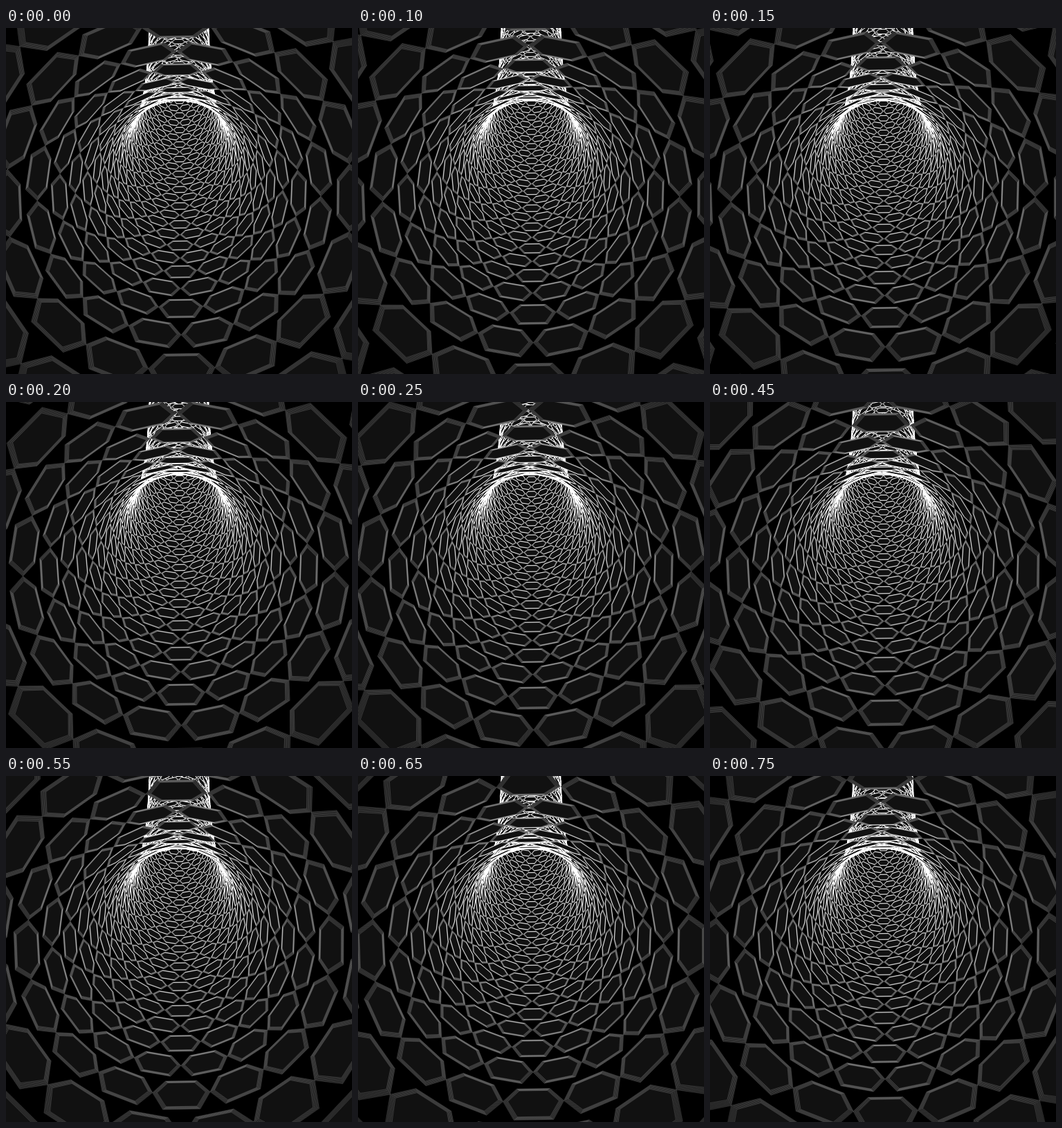
An HTML page with a canvas for the animation above (800 ms loop, 500 by 500 pixels).

```html
<!DOCTYPE html>
<html lang="en">
<head>
<meta charset="utf-8">
<title>Hexagon tunnel</title>
<style>
  html, body { margin: 0; width: 100%; height: 100%; overflow: hidden; background: #000; }
  canvas { display: block; width: 500px; height: 500px; }
</style>
</head>
<body>
<canvas id="stage" width="500" height="500"></canvas>
<script>
const ctx = document.getElementById('stage').getContext('2d');
const LOOP = 800, STEPS = 16;

// Torus with major radius 1; the camera sits inside the tube.
const TUBE = 0.1325, BACK = 0.169, FOCAL = 367;
const AROUND = 16;
const PERIOD = 2 * Math.PI / 72;
const START = 0.112, ROLL = 0.016;
const HALF = Math.PI / AROUND;
const FIRST_ROW = -7, LAST_ROW = 38;

// Nested outlines inside each hexagon.
const LINES = 6, INSET = 0.032;

// Corners as [across, along] in half widths and periods.
const FLAT = 0.59, RISE = (1 - FLAT) / 2;
const CORNERS = [[1, 0], [FLAT, RISE], [-FLAT, RISE], [-1, 0], [-FLAT, -RISE], [FLAT, -RISE]];

function place(theta, phi) {
  const radius = 1 + TUBE * Math.cos(phi);
  return [
    TUBE * Math.sin(phi),
    1 - radius * Math.cos(theta),
    BACK + radius * Math.sin(theta)
  ];
}

function hexagon(theta, phi) {
  const points = CORNERS.map(([a, l]) => place(theta + l * PERIOD, phi + a * HALF));
  const mid = [0, 1, 2].map(i => points.reduce((sum, p) => sum + p[i], 0) / 6);
  return { points, mid, dist: Math.hypot(...mid) };
}

function trace({ points, mid }, scale) {
  ctx.beginPath();
  for (const p of points) {
    const [x, y, z] = p.map((v, i) => mid[i] + (v - mid[i]) * scale);
    ctx.lineTo(250 + FOCAL * x / z, 250 - FOCAL * y / z);
  }
  ctx.closePath();
}

function draw(progress) {
  const cells = [];
  for (let row = FIRST_ROW; row <= LAST_ROW; row++) {
    const theta = START + (row / 2 - progress) * PERIOD;
    const shift = row % 2 ? HALF : 0;
    for (let i = 0; i < AROUND; i++) {
      const cell = hexagon(theta, ROLL + shift + 2 * HALF * i);
      if (cell.points.every(p => p[2] > 0.02)) cells.push(cell);
    }
  }
  cells.sort((a, b) => b.dist - a.dist);

  ctx.globalCompositeOperation = 'source-over';
  ctx.fillStyle = '#000';
  ctx.fillRect(0, 0, 500, 500);
  ctx.fillStyle = '#111';
  ctx.strokeStyle = 'rgba(255, 255, 255, 0.17)';
  ctx.lineWidth = 1;
  ctx.lineJoin = 'bevel';
  for (const cell of cells) {
    ctx.globalCompositeOperation = 'source-over';
    trace(cell, 1);
    ctx.fill();
    // Outlines add up, so distant edges turn white.
    ctx.globalCompositeOperation = 'lighter';
    for (let i = 0; i < LINES; i++) {
      trace(cell, 1 - i * INSET);
      ctx.stroke();
    }
  }
}

const begin = performance.now();
let shown = -1;

function tick() {
  const time = (performance.now() - begin) % LOOP;
  const step = Math.floor(time / LOOP * STEPS);
  if (step !== shown) {
    shown = step;
    draw(step / STEPS);
  }
  requestAnimationFrame(tick);
}
tick();
</script>
</body>
</html>
```
